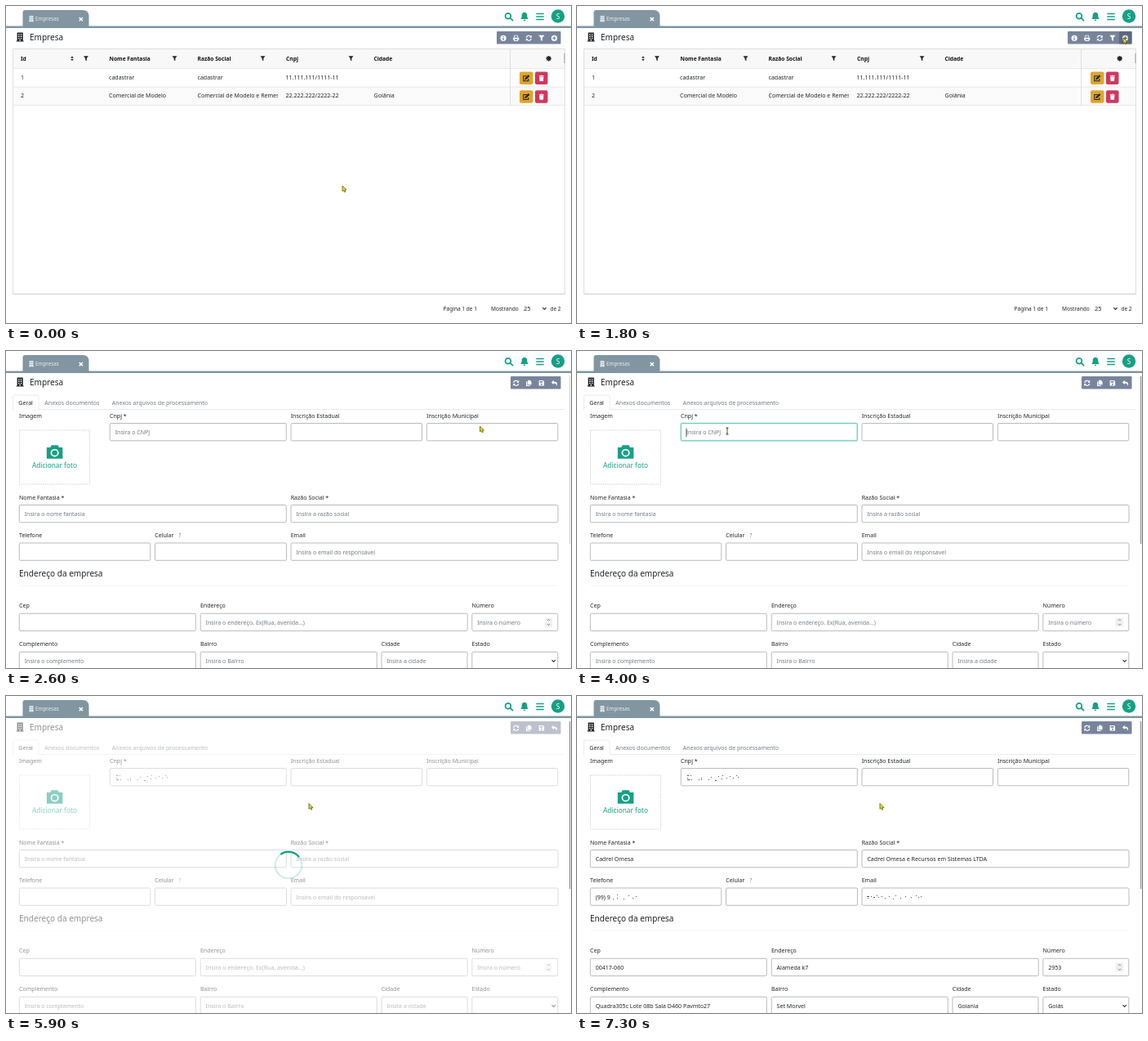
Recreate the animation shown at these times as an HTML page. Size 692x388 px, loop 8 s.

```html
<!DOCTYPE html>
<html lang="pt-BR">
<head>
<meta charset="utf-8">
<title>Cadastro de empresa</title>
<style>
html, body { margin: 0; width: 100%; height: 100%; overflow: hidden; background: #fff; }
svg { display: block; width: 692px; height: 388px; font-family: "Noto Sans", "Open Sans", sans-serif; }
</style>
</head>
<body>
<svg id="stage" viewBox="0 0 692 388"></svg>
<script>
const GREEN = '#16a085', INK = '#212529', MUTED = '#747b82', BAR = '#78849b';

const text = (x, y, s, size = 7.05, fill = INK, extra = '') =>
  `<text x="${x}" y="${y}" font-size="${size}" fill="${fill}" ${extra}>${s}</text>`;
const rect = (x, y, w, h, fill, extra = '') =>
  `<rect x="${x}" y="${y}" width="${w}" height="${h}" fill="${fill}" ${extra}/>`;
const line = (d, stroke, width = 1, extra = '') =>
  `<path d="${d}" fill="none" stroke="${stroke}" stroke-width="${width}" ${extra}/>`;
const group = (id, body) => `<g id="${id}">${body}</g>`;

// Icons sit in a box of about 10 units around the origin.
const fillPath = (d) => `<path d="${d}" fill="currentColor" fill-rule="evenodd"/>`;
const strokePath = (d, w = 1.6) => line(d, 'currentColor', w);
const disc = 'M-5 0a5 5 0 1 0 10 0a5 5 0 1 0 -10 0z';
const teeth = [0, 45, 90, 135].map(a =>
  `<path d="M0 -5V5" stroke="currentColor" stroke-width="2.2" transform="rotate(${a})"/>`).join('');
const icons = {
  building: fillPath('M-4 -6H4V5H5V6H-5V5H-4zM-2.3 -4.3V-2.8H-.7V-4.3zM.7 -4.3V-2.8H2.3V-4.3zM-2.3 -1.6V-.1H-.7V-1.6zM.7 -1.6V-.1H2.3V-1.6zM-2.3 1V2.5H-.7V1zM.7 1V2.5H2.3V1zM-.8 3.4V5H.8V3.4z'),
  search: strokePath('M-4.2 -1a3.2 3.2 0 1 0 6.4 0a3.2 3.2 0 1 0 -6.4 0M1.4 1.4L4.8 4.8', 1.7),
  bell: fillPath('M0 -5.4C3 -5 3.5 -3 3.5 -.8Q3.5 1.5 4.8 3.2H-4.8Q-3.5 1.5 -3.5 -.8C-3.5 -3 -3 -5 0 -5.4zM-1.5 4H1.5Q1 5.6 0 5.6T-1.5 4z'),
  bars: strokePath('M-5 -3.7H5M-5 0H5M-5 3.7H5', 1.5),
  info: fillPath(disc + 'M-.9 -3.3V-1.7H.9V-3.3zM-1.4 -.8V.3H-.8V2.2H-1.4V3.3H1.4V2.2H.8V-.8z'),
  plus: fillPath(disc + 'M-.8 -3V-.8H-3V.8H-.8V3H.8V.8H3V-.8H.8V-3z'),
  print: fillPath('M-3.4 -5H2.4L3.4 -4V-1H-3.4zM-2.2 -3.8V-1H2.2V-3.8zM-5 -.7H5V3.2H3.4V5H-3.4V3.2H-5zM-2.2 1.8V3.8H2.2V1.8z'),
  sync: strokePath('M-4.2 -.7A4.2 4.2 0 0 1 3.2 -2.7M4.2 .7A4.2 4.2 0 0 1 -3.2 2.7') +
    fillPath('M4.9 -5V-.9H.8zM-4.9 5V.9H-.8z'),
  filter: fillPath('M-5 -5H5L1.4 -.5V5L-1.4 3V-.5z'),
  copy: fillPath('M-1.6 -5H2L4.5 -2.6V2.8H-1.6zM-4.5 -2.8H-2.6V3.8H2V5H-4.5z'),
  save: fillPath('M-4.5 -4.5H2.8L4.5 -2.8V4.5H-4.5zM-3 -3.2V-.8H2V-3.2zM-1.4 2a1.4 1.4 0 1 0 2.8 0a1.4 1.4 0 1 0 -2.8 0z'),
  back: fillPath('M-5 -1.2L-1 -4.8V-2.6C3.4 -2.6 5 -1 5 1.3Q5 3.3 3.2 4.5C3.8 1.2 2.6 .3 -1 .3V2.4z'),
  gear: teeth + strokePath('M-2.7 0a2.7 2.7 0 1 0 5.4 0a2.7 2.7 0 1 0 -5.4 0', 2),
  sort: fillPath('M0 -5L3 -1H-3zM0 5L3 1H-3z'),
  edit: strokePath('M1 -3.3H-4.3V4.3H3.3V1', 1.3) + fillPath('M3.2 -5L5.2 -3L0 2.2L-2.4 2.6L-2 .2z'),
  trash: fillPath('M-4.2 -4.3H-1.6L-1 -5H1L1.6 -4.3H4.2V-3.1H-4.2zM-3.6 -2.4H3.6L3.1 5H-3.1z'),
  camera: fillPath('M-5 -3H-2.7L-2 -4.5H2L2.7 -3H5V4.4H-5zM-2.6 .6a2.6 2.6 0 1 0 5.2 0a2.6 2.6 0 1 0 -5.2 0zM-1.7 .6a1.7 1.7 0 1 0 3.4 0a1.7 1.7 0 1 0 -3.4 0z'),
  down: strokePath('M-4 -2L0 2L4 -2', 2),
};
const icon = (name, x, y, color, sx = 0.75, sy = sx) =>
  `<g transform="translate(${x} ${y}) scale(${sx} ${sy})" color="${color}">${icons[name]}</g>`;

const toolbar = (names, x) => rect(x, 31, 679.5 - x, 15.5, BAR, 'rx="1"') +
  names.map((n, i) => icon(n, 671.5 - 15.6 * (names.length - 1 - i), 39.3, '#fff', 0.72)).join('');

// Remnants of wiped-out characters: pairs of offset and height.
const scraps = (x, y, marks) => marks.map(([dx, dy, w = 1]) =>
  rect(x + dx, y + dy, w, 1, '#555')).join('');

const header =
  line('M0 25.7H692', '#7f95a3', 2.4) +
  `<path d="M20.5 26V8Q20.5 5 23.5 5H94Q101.500 5 101.500 13V26z" fill="#8196a1"/>` +
  icon('building', 31, 15.6, '#e9eef0', 0.6) + text(36, 18, 'Empresas', 6.3, '#e9eef0') +
  line('M89.700 14L94 18.300M94 14L89.700 18.300', '#fff', 1.5) +
  icon('search', 616, 13.2, GREEN, 1.05) + icon('bell', 635, 13, GREEN, 0.95) +
  icon('bars', 654, 13, GREEN, 0.95) +
  `<circle cx="676" cy="12.500" r="8.200" fill="${GREEN}"/>` +
  text(676, 15.7, 'S', 8.5, '#fff', 'text-anchor="middle"');

const title = icon('building', 17.2, 38, INK, 0.9) + text(29, 42, 'Empresa', 10);

function tableRow(y, cells) {
  const xs = [18, 126, 234.5, 342.5, 450.5];
  return cells.map((s, i) => text(xs[i], y + 2.6, s, 7.05, INK, i == 2 ? 'clip-path="url(#cell)"' : '')).join('') +
    rect(629, y - 6.5, 16.5, 15.5, '#dfa52c', 'rx="2"') + icon('edit', 637.2, y + 1.3, INK, 0.8) +
    rect(648, y - 6.5, 15.5, 15.5, '#d2365f', 'rx="2"') + icon('trash', 655.8, y + 1.3, '#fff', 0.72);
}

const list = title +
  toolbar(['info', 'print', 'sync', 'filter', 'plus'], 601) +
  group('hover', rect(664, 31, 15.5, 15.5, '#5d677e', 'rx="1"') + icon('plus', 671.5, 39.3, '#dfe3e9', 0.72)) +
  rect(8.5, 52.5, 676, 24, '#f8f8f8') + rect(8.5, 99, 676, 22.5, '#fafafa') +
  line('M8.5 353V52.5H684.500V353', '#d4d7d9', 0.8) + line('M8.5 352.500H684.500', '#c9cdd0') +
  line('M8.5 76.500H684M8.5 99H684M8.5 121.500H684', '#e3e5e6', 0.8) +
  line('M617.500 53V121.500', '#d5d8da', 0.8) + line('M684 58V70', '#8f9498', 0.9) +
  [[18, 'Id'], [126.5, 'Nome Fantasia'], [234.5, 'Razão Social'], [343, 'Cnpj'], [450.5, 'Cidade']]
    .map(([x, s]) => text(x, 66.7, s, 6.7, '#111', 'font-weight="600"')).join('') +
  icon('sort', 81, 64.3, INK, 0.6) +
  [98, 206.5, 314.5, 422.5].map(x => icon('filter', x, 64.3, INK, 0.6)).join('') +
  icon('gear', 664.7, 64.3, INK, 0.65) +
  tableRow(87, ['1', 'cadastrar', 'cadastrar', '11.111.111/1111-11']) +
  tableRow(109.8, ['2', 'Comercial de Modelo', 'Comercial de Modelo e Remessas', '22.222.222/2222-22', 'Goiânia']) +
  text(535.5, 373, 'Página 1 de 1', 6.57) + text(594, 373, 'Mostrando', 6.57) +
  text(634, 373.2, '25', 7.5) + icon('down', 659.5, 370.3, INK, 0.55) + text(666.5, 373, 'de 2', 6.5);

// x, y, width, label, placeholder, value
const fields = [
  [127.3, 88.5, 216, 'Cnpj *', 'Insira o CNPJ'],
  [349, 88.5, 160.5, 'Inscrição Estadual'],
  [515.3, 88.5, 160.5, 'Inscrição Municipal'],
  [16.3, 188.5, 327, 'Nome Fantasia *', 'Insira o nome fantasia', 'Cadrel Omesa'],
  [349, 188.5, 327, 'Razão Social *', 'Insira a razão social', 'Cadrel Omesa e Recursos em Sistemas LTDA'],
  [16.3, 235, 160.5, 'Telefone', '', '(99) 9'],
  [182.5, 235, 161, 'Celular'],
  [349, 235, 327, 'Email', 'Insira o email do responsável', ' '],
  [16.3, 321.3, 216, 'Cep', '', '00417-060'],
  [238.2, 321.3, 327, 'Endereço', 'Insira o endereço. Ex(Rua, avenida...)', 'Alameda k7'],
  [570.8, 321.3, 105, 'Número', 'Insira o número', '2953'],
  [16.3, 368.3, 216, 'Complemento', 'Insira o complemento', 'Quadra305c Lote 08b Sala D460 Pavmto27'],
  [238.2, 368.3, 216, 'Bairro', 'Insira o Bairro', 'Set Morvel'],
  [460, 368.3, 105, 'Cidade', 'Insira a cidade', 'Goiania'],
  [570.8, 368.3, 105, 'Estado', '', 'Goiás'],
];
const fieldText = (pick, color, from = 0) => fields.slice(from).map(f =>
  f[pick] ? text(f[0] + 6.4, f[1] + 13.6, f[pick], 7.05, color) : '').join('');

const form = title + toolbar(['sync', 'copy', 'save', 'back'], 618) +
  line('M8.500 72V56Q8.500 54 10.500 54H38Q40 54 40 56V71.500H684', '#e2e5e8', 0.8) +
  text(15.3, 65.5, 'Geral') + text(47.3, 65.5, 'Anexos documentos', 7.05, MUTED) +
  text(129.8, 65.5, 'Anexos arquivos de processamento', 7.05, MUTED) +
  text(16, 81.5, 'Imagem') +
  rect(16.5, 97, 86, 66, 'none', 'stroke="#c3c8cc" stroke-width=".8" stroke-dasharray="1.500 1.200"') +
  icon('camera', 59.6, 123.6, GREEN, 1.95, 1.85) +
  text(59.5, 143, 'Adicionar foto', 8.3, GREEN, 'text-anchor="middle"') +
  fields.map(([x, y, w, label]) => text(x - 0.3, y - 7, label) +
    rect(x, y, w, 21.3, '#fff', 'rx="1.500" stroke="#b0b3b6" stroke-width=".9"')).join('') +
  text(211.5, 228.3, '?', 6.5, MUTED) +
  text(16, 276, 'Endereço da empresa', 10.05) + line('M16 287H676', '#f0f1f2', 0.8) +
  rect(659.7, 326.5, 9.5, 11, '#efefef') +
  icon('down', 664.5, 334.8, '#666', 0.4) + icon('down', 664.5, 329.2, '#666', 0.4, -0.4) +
  icon('down', 670.7, 379.3, '#333', 0.55) +
  group('ring', rect(127.3, 88.5, 216, 21.3, 'none', 'rx="1.500" stroke="#5fe0c4" stroke-width="2.600" opacity=".5"') +
    rect(127.3, 88.5, 216, 21.3, 'none', 'rx="1.500" stroke="#3fd0b2" stroke-width="1"')) +
  group('hint', text(133.7, 102.1, 'Insira o CNPJ', 7.05, MUTED)) +
  group('pasted', scraps(134, 97, [[1, 0, 2], [1, 3], [1, 5, 3], [5, 0], [6, 5], [15, 5], [18, 5], [18, 3], [27, 5],
    [30, 2], [35, 6, 2], [39, 1], [43, 4], [44, 0], [49, 3], [53, 1], [57, 3], [61, 0], [63, 2]])) +
  group('blank', fieldText(4, MUTED, 1)) +
  group('filled', fieldText(5, INK) +
    scraps(41, 243, [[3, 5], [8, 0], [8, 4], [16, 5], [22, 1], [27, 4], [31, 2]]) +
    scraps(355, 243, [[0, 2, 3], [1, 4], [5, 2], [8, 3, 2], [12, 1], [14, 3], [18, 2], [22, 4], [27, 2], [32, 5],
      [35, 1], [41, 4], [47, 2], [54, 3], [60, 1], [63, 3], [66, 2]])) +
  line('M134 94.500V105', INK, 0.8, 'id="caret"') +
  group('loading', rect(8, 28, 677, 360, '#fff', 'opacity=".5"') +
    `<circle cx="346" cy="207" r="16.300" fill="none" stroke="${GREEN}" stroke-opacity=".2" stroke-width="2"/>` +
    line('M334.470 218.530A16.300 16.300 0 0 1 334.470 195.470', GREEN, 2.1, 'id="arc"')) +
  line('M690.600 31V236', '#8b8f93', 1.2, 'id="scroll"');

const pointer = group('pointer',
  group('arrow', '<path d="M0 0V6.800L1.600 5.500L2.700 7.800L3.900 7.200L2.900 5H5z" fill="#e6e11c" stroke="#4b4a10" stroke-width=".7"/>') +
  group('beam', line('M-1.500 -4H1.500M0 -4V4M-1.500 4H1.500', '#222', 0.9) + rect(-1, -1, 2, 2, '#c9c21c')));

document.getElementById('stage').innerHTML =
  '<clipPath id="cell"><path d="M230 76H333V125H230z"/></clipPath>' +
  header + group('list', list) + group('form', form) + pointer;

const el = id => document.getElementById(id);
const show = (id, opacity) => el(id).setAttribute('opacity', Number(opacity));

// time, x, y
const route = [
  [0, 412, 220], [900, 370, 101], [1400, 669, 39], [2400, 669, 39], [2600, 580.5, 92], [2700, 571, 97],
  [2800, 571, 97], [3100, 500, 156], [3200, 500, 156], [3400, 440, 172], [3700, 200, 91], [3800, 184, 98],
  [4600, 184, 98], [5100, 363, 142.5], [5500, 367, 141], [5600, 371, 131.5], [8000, 371, 131.5],
];
function position(t) {
  const i = route.findIndex(p => p[0] > t);
  const [a, b] = [route[i - 1], route[i]];
  const k = (t - a[0]) / (b[0] - a[0]);
  return [a[1] + (b[1] - a[1]) * k, a[2] + (b[2] - a[2]) * k];
}

function draw(now) {
  const t = Math.floor(now % 8000 / 100) * 100; // ten steps per second
  const onForm = t >= 2400;
  show('list', !onForm);
  show('form', onForm);
  show('hover', t >= 1400);
  show('scroll', t < 2700 ? 0.35 : 1);
  show('ring', t < 4000 || t >= 5600 ? 0 : t < 4100 ? 0.5 : 1);
  show('caret', t >= 4000 && t < 4300);
  show('hint', t < 4700);
  show('pasted', t >= 4700);
  show('blank', t < 7100);
  show('filled', t >= 7100);
  show('loading', t < 5600 ? 0 : Math.max(0, Math.min(1, (7300 - t) / 200)));
  el('arc').setAttribute('transform', `rotate(${(t - 5600) / 1100 * 360} 346 207)`);

  const [x, y] = position(t);
  const overField = onForm && x > 127 && x < 343 && y > 88 && y < 110;
  el('pointer').setAttribute('transform', `translate(${x} ${y})`);
  show('beam', overField);
  show('arrow', !overField);
}
function tick() {
  draw(performance.now());
  requestAnimationFrame(tick);
}
tick();
</script>
</body>
</html>
```
